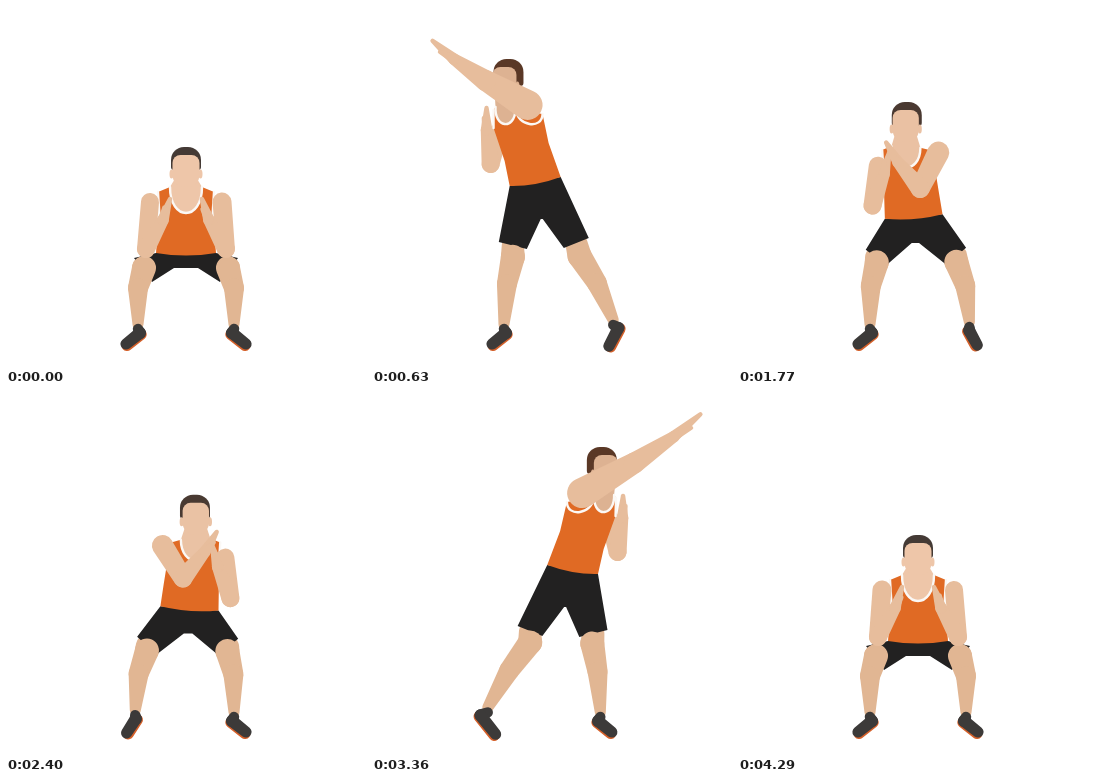
An HTML page with a canvas that plays this animation: 360 px wide and 360 px high, repeating every 4.32 s.

```html
<!DOCTYPE html>
<html lang="en">
<head>
<meta charset="utf-8">
<title>Squat and punch</title>
<style>
  html, body { margin: 0; width: 100%; height: 100%; overflow: hidden; background: #fff; }
  canvas { display: block; width: 360px; height: 360px; }
</style>
</head>
<body>
<canvas id="stage"></canvas>
<script>
const SIZE = 360, HALF = 2160, LOOP = 2 * HALF;
const LEFT = 1, RIGHT = 2;
const ARM = '#e7bd9c', LEG = '#e1b693', ORANGE = '#e06a24', BLACK = '#222121';
const SHOE = '#3c3a39', SOLE = '#d4602a', TRIM = '#fbf8f5';

const canvas = document.getElementById('stage');
const ctx = canvas.getContext('2d');
const dpr = window.devicePixelRatio || 1;
canvas.width = canvas.height = SIZE * dpr;

// Joint: left side in the squat (the right side mirrors it), then standing left and right.
const RIG = {
  neck:     [[164, 181], [124, 101], [144, 104]],
  strap:    [[152, 186], [122, 104], [145, 104]],
  pit:      [[154, 218], [122, 122], [171, 108]],
  waist:    [[151, 235], [133, 155], [177, 137]],
  hem:      [[150, 247], [138, 180], [189, 171]],
  cuffOut:  [[128, 252], [127, 236], [217, 232]],
  cuffIn:   [[146, 276], [155, 243], [192, 242]],
  thigh:    [[138, 262], [141, 251], [208, 250]],
  calf:     [[132, 282], [135, 278], [225, 277]],
  ankle:    [[132, 318], [132, 318], [241, 314]],
  heel:     [[134, 327], [134, 327], [246, 322]],
  toe:      [[120, 338], [120, 338], [237, 340]],
  shoulder: [[144, 196], [128, 125], [156, 99]],
  elbow:    [[140, 243], [119, 158], [115, 75]],
  wrist:    [[157, 214], [115, 124], [84, 54]],
  tip:      [[164, 193], [115, 102], [63, 36]],
  head:     [[180, 161], [137, 73]],
  collar:   [[180, 207], [133, 118]],
  crotch:   [[180, 262], [170, 213]]
};

const span = (t, a, b) => Math.max(0, Math.min(1, (t - a) / (b - a)));
const smooth = u => (1 - Math.cos(Math.PI * u)) / 2;
const gentle = u => (u + smooth(u)) / 2;
const mix = (a, b, k) => a + (b - a) * k;
const tone = (a, b, k) => `rgb(${a.map((v, i) => Math.round(mix(v, b[i], k)))})`;

// rise: squat to standing; reach: punching arm; lean: drift at full height.
function progress(t) {
  return {
    rise: smooth(span(t, 0, 510)) - smooth(span(t, 1490, 2060)),
    reach: gentle(span(t, 0, 630)) - gentle(span(t, 1350, 2040)),
    lean: Math.sin(Math.PI / 2 * span(t, 610, 1080)) - smooth(span(t, 1110, 1530))
  };
}

function joint(name, side, lean, ky, kx = ky * ky) {
  const [squat, ...stand] = RIG[name];
  const x0 = side === RIGHT ? SIZE - squat[0] : squat[0];
  const [x1, y1] = stand[side - 1];
  const y = mix(squat[1], y1, ky);
  return [mix(x0, x1, kx) - lean * 0.03 * (330 - y), y];
}

function fill(color) {
  ctx.fillStyle = color;
  ctx.fill();
}

function path(points) {
  ctx.beginPath();
  points.forEach(p => ctx.lineTo(...p));
}

function bone([ax, ay], ra, [bx, by], rb, color) {
  const dir = Math.atan2(by - ay, bx - ax), d = Math.hypot(bx - ax, by - ay);
  const k = Math.acos(Math.max(-1, Math.min(1, (ra - rb) / (d || 1))));
  ctx.beginPath();
  ctx.arc(ax, ay, ra, dir + k, dir - k + Math.PI * 2);
  ctx.arc(bx, by, rb, dir - k, dir + k);
  ctx.closePath();
  fill(color);
}

// Curve from a to c whose middle is m.
function bend([a, m, c]) {
  const shift = i => (m[i] - (a[i] + c[i]) / 2) * 4 / 3;
  const dx = shift(0), dy = shift(1);
  ctx.lineTo(...a);
  ctx.bezierCurveTo(a[0] + dx, a[1] + dy, c[0] + dx, c[1] + dy, ...c);
}

function trim(curve) {
  ctx.beginPath();
  bend(curve);
  ctx.strokeStyle = TRIM;
  ctx.lineWidth = 2.4;
  ctx.stroke();
}

function shoe(ankle, heel, toe) {
  const dx = toe[0] - heel[0], dy = toe[1] - heel[1];
  const k = 1.8 * (Math.sign(dx) || 1) / Math.hypot(dx, dy);
  const down = ([x, y]) => [x - dy * k, y + dx * k];
  bone(down(heel), 5.6, down(toe), 5.6, SOLE);
  bone(ankle, 5.2, heel, 6, SHOE);
  bone(heel, 6, toe, 5.6, SHOE);
}

function arm([shoulder, elbow, wrist, tip], rs, re) {
  const dx = tip[0] - wrist[0], dy = tip[1] - wrist[1];
  const thumb = [wrist[0] + 0.55 * dx + 0.13 * dy, wrist[1] + 0.55 * dy - 0.13 * dx];
  bone(shoulder, rs, elbow, re, ARM);
  bone(elbow, re, wrist, 5.8, ARM);
  bone(wrist, 5.8, tip, 2.2, ARM);
  bone(wrist, 4.5, thumb, 2, ARM);
}

function head([x, y], neckline, turn) {
  const face = tone([238, 198, 169], [221, 178, 146], turn);
  const hair = tone([68, 58, 53], [90, 56, 38], turn);
  const fx = x - 4 * turn, r = 13.5 - 1.5 * turn;
  ctx.beginPath();
  bend(neckline);
  ctx.lineTo(fx + 10, y + 10);
  ctx.lineTo(fx - 10, y + 10);
  fill(face);
  ctx.beginPath();
  ctx.roundRect(x - 15, y - 20, 30, 23 + 4 * turn, [13, 13, 3, 3]);
  fill(hair);
  for (const s of [-1, 1]) {
    ctx.beginPath();
    ctx.ellipse(fx + s * (r + 1), y + 7, 2, 4.5, 0, 0, Math.PI * 2);
    fill(face);
  }
  ctx.beginPath();
  ctx.roundRect(fx - r, y - 12, 2 * r, 32, [8, 8, 12, 12]);
  fill(face);
}

function draw(time) {
  const t = time % LOOP;
  const { rise, reach, lean } = progress(t % HALF);
  const at = (name, side = LEFT) => joint(name, side, lean, rise);
  const legAt = (name, side) => joint(name, side, lean, rise + 0.15 * lean);
  const sides = [LEFT, RIGHT];

  ctx.setTransform(dpr, 0, 0, dpr, 0, 0);
  ctx.fillStyle = '#fff';
  ctx.fillRect(0, 0, SIZE, SIZE);
  ctx.lineJoin = ctx.lineCap = 'round';
  if (t >= HALF) {
    ctx.translate(SIZE, 0);
    ctx.scale(-1, 1);
  }

  // Thighs go under the shorts, knees over them.
  const crotch = at('crotch'), gap = 1 + 11 * (1 - rise) ** 2;
  const mid = s => at('cuffOut', s).map((v, i) => (v + at('cuffIn', s)[i]) / 2);
  for (const s of sides) bone(mid(s), 11, legAt('thigh', s), 12, LEG);
  path([at('hem'), at('cuffOut'), at('cuffIn'), [crotch[0] - gap, crotch[1]],
    [crotch[0] + gap, crotch[1]], at('cuffIn', RIGHT), at('cuffOut', RIGHT), at('hem', RIGHT)]);
  fill(BLACK);
  for (const s of sides) {
    const calf = legAt('calf', s), ankle = legAt('ankle', s);
    bone(legAt('thigh', s), 12, calf, 10, LEG);
    bone(calf, 10, ankle, 5.5, LEG);
    shoe([ankle[0], ankle[1] + 5], legAt('heel', s), legAt('toe', s));
  }

  const guard = ['shoulder', 'elbow', 'wrist', 'tip'].map(n => at(n));
  const drawGuard = () => arm(guard, 9, 9);
  const behind = rise > 0.7;
  if (behind) drawGuard();

  const hole = (s, sag) => {
    const a = at('strap', s), c = at('pit', s);
    return [a, [(a[0] + c[0]) / 2, (a[1] + c[1]) / 2 + sag], c];
  };
  const holes = [hole(LEFT, 0), hole(RIGHT, 12 * rise * rise)];
  const neckline = [at('neck'), at('collar'), at('neck', RIGHT)];
  const hems = sides.map(s => at('hem', s));
  path([at('neck'), at('strap'), at('pit'), at('waist'), hems[0]]);
  ctx.quadraticCurveTo((hems[0][0] + hems[1][0]) / 2, (hems[0][1] + hems[1][1]) / 2 + 5, ...hems[1]);
  for (const n of ['waist', 'pit', 'strap', 'neck']) ctx.lineTo(...at(n, RIGHT));
  fill(ORANGE);
  head(at('head'), neckline, rise * rise);
  [neckline, ...holes].forEach(trim);
  if (!behind) drawGuard();

  // The punch stretches away from the shoulder while leaning.
  const shoulder = at('shoulder', RIGHT);
  const punch = ['elbow', 'wrist', 'tip'].map(n =>
    joint(n, RIGHT, lean, reach, reach).map((v, i) => mix(shoulder[i], v, 1 + 0.28 * lean)));
  arm([shoulder, ...punch], 9.5 + 5.5 * rise * rise, 9 + 1.5 * reach);
}

const start = performance.now();
function tick() {
  draw(performance.now() - start);
  requestAnimationFrame(tick);
}
tick();
</script>
</body>
</html>
```
